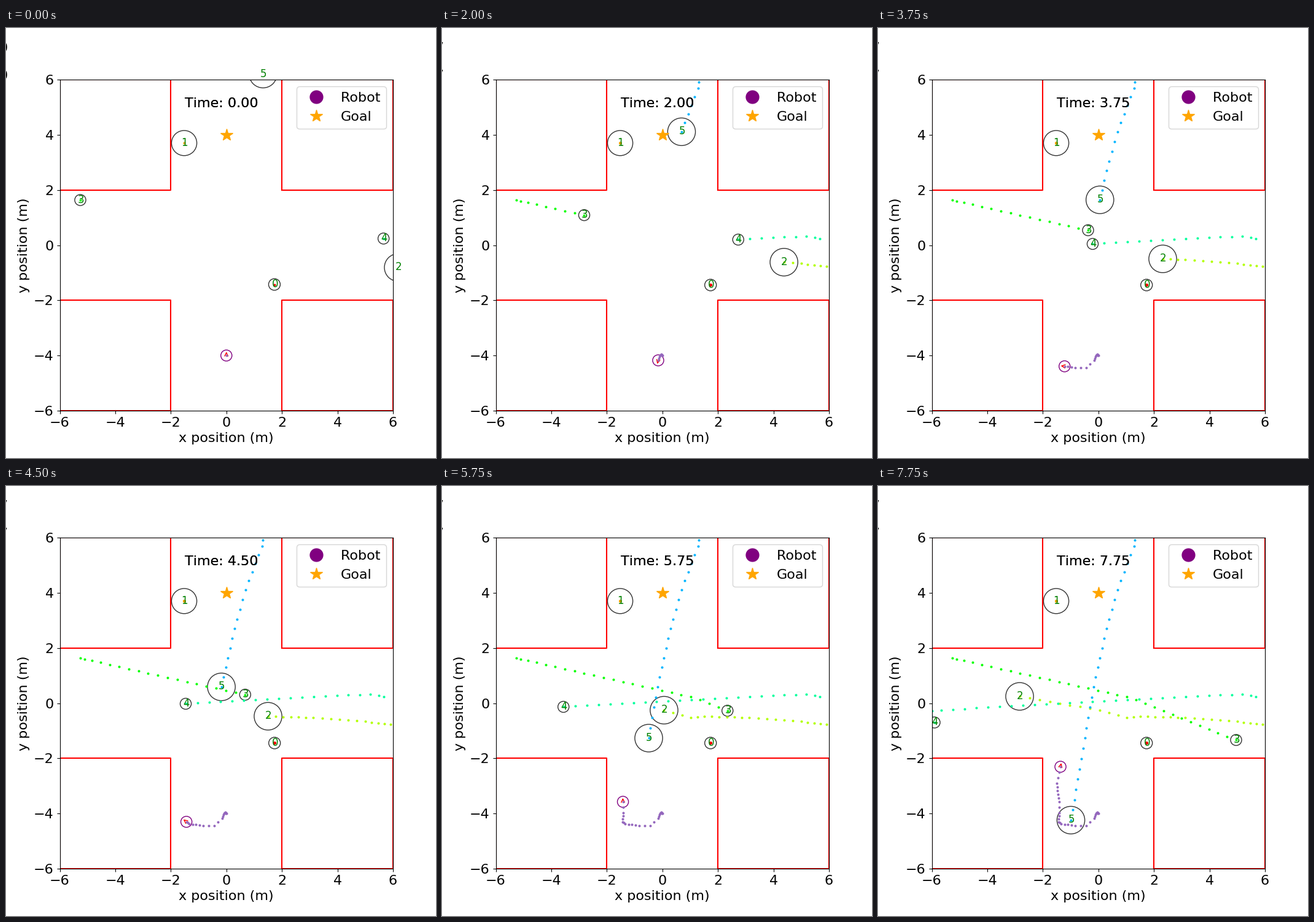
A matplotlib script that plays this animation: 700x700 px, repeating every 8 s.

```python
import numpy as np
import matplotlib.pyplot as plt
from matplotlib.animation import FuncAnimation
from matplotlib.lines import Line2D
from matplotlib.patches import ArrowStyle, Circle, FancyArrowPatch

STEPS = 32
DT = 0.25
ROBOT_R = 0.2

plt.rcParams["font.family"] = "DejaVu Sans"
plt.rcParams["text.kerning_factor"] = 6


def walk(*keys):
    """Steady walk between (step, x, y) key points, with a soft start.

    The walker's clock begins at 1 and settles onto the step number.
    """
    k, x, y = np.array(keys, dtype=float).T
    steps = np.arange(STEPS)
    clock = steps + np.exp(-steps / 1.2)
    return np.column_stack([np.interp(clock, k, x), np.interp(clock, k, y)])


# Radius and path of each person
humans = [
    (.21, walk((1, 1.73, -1.425), (4, 1.735, -1.445))),
    (.455, walk((1, -1.52, 3.70))),
    (.5, walk((1, 6.19, -.81), (6, 5.0, -.665), (12, 3.135, -.52),
              (18, 1.5, -.475), (20, 1.03, -.53), (23, .06, -.255),
              (31, -2.835, .245))),
    (.2, walk((1, -5.26, 1.635), (19.5, 1.2, .19), (31, 4.96, -1.335))),
    (.2, walk((1, 5.66, .24), (2, 5.25, .335), (28, -5.66, -.245),
              (29.3, -6.1, -.3), (31, -5.9, -.7))),
    (.5, walk((1, 1.32, 6.2), (3, 1.29, 5.72), (8, .69, 4.11),
              (12, .29, 2.695), (18, -.18, .59), (31, -.99, -4.24))),
]

robot = walk((1, 0, -4), (3, -.04, -3.95), (6, -.11, -4.03),
             (8, -.15, -4.175), (10, -.44, -4.44), (12, -.835, -4.44),
             (16, -1.345, -4.375), (18, -1.44, -4.3), (21, -1.405, -3.975),
             (23, -1.42, -3.575), (28, -1.5, -2.9), (31, -1.365, -2.305))

fig, ax = plt.subplots(figsize=(7, 7), dpi=100)
ax.set_xlim(-6, 6)
ax.set_ylim(-6, 6)
ax.set_xticks(range(-6, 7, 2))
ax.set_yticks(range(-6, 7, 2))
ax.tick_params(labelsize=16)
ax.set_xlabel("x position (m)", fontsize=16)
ax.set_ylabel("y position (m)", fontsize=16)

# Four corner blocks leave a crossing free
for x in (-6, 2):
    for y in (-6, 2):
        ax.plot([x, x + 4, x + 4, x, x], [y, y, y + 4, y + 4, y],
                color="red", lw=1.5)

goal = Line2D([0], [4], color="orange", marker="*", ls="None", ms=15)
ax.add_artist(goal)
robot_key = Line2D([], [], color="purple", marker="o", ls="None", ms=15)
ax.legend([robot_key, goal], ["Robot", "Goal"], fontsize=16,
          loc="upper right", numpoints=1)


class Walker:
    """A ring that leaves one dot per step."""

    def __init__(self, path, radius, edge, dot, alpha=1):
        self.path = path
        self.ring = ax.add_patch(Circle(path[0], radius, fill=False, lw=1,
                                        ec=edge, alpha=alpha))
        self.trail, = ax.plot([], [], "o", color=dot, ms=2.9, mew=0,
                              zorder=1.5)

    def move(self, k):
        self.ring.center = self.path[k]
        self.trail.set_data(*self.path[:k + 1].T)


people = [Walker(path, r, "black", plt.cm.hsv(i / 9), alpha=.8)
          for i, (r, path) in enumerate(humans)]
labels = [ax.text(0, 0, str(i), color="green", fontsize=12)
          for i in range(len(people))]

rover = Walker(robot, ROBOT_R, "purple", "tab:purple")
arrow = FancyArrowPatch((0, 0), (0, 1), color="red", mutation_scale=1,
                        arrowstyle=ArrowStyle("->", head_length=4,
                                              head_width=2))
ax.add_patch(arrow)

# The clock is printed twice, which gives it a heavier edge
clocks = [ax.text(-1.5, 5, "", fontsize=16) for _ in range(2)]
# Last digits of two readouts cut off by the left border
readouts = [ax.text(-8.2, y, "", fontsize=16) for y in (7, 6)]


def heading(k):
    """Unit vector of the last move; the robot starts facing up."""
    if k == 0:
        return np.array([0, 1])
    step = robot[k] - robot[k - 1]
    return step / np.hypot(*step)


def update(k):
    for person, label in zip(people, labels):
        person.move(k)
        label.set_position(person.path[k] - .1)

    rover.move(k)
    arrow.set_positions(robot[k], robot[k] + ROBOT_R * heading(k))

    for clock in clocks:
        clock.set_text(f"Time: {k * DT:.2f}")
    for readout in readouts:
        readout.set_text("0" if k * DT < 1 else "7")
    return []


anim = FuncAnimation(fig, update, frames=STEPS, init_func=lambda: [],
                     interval=1000 * DT, repeat=True, repeat_delay=0)
plt.show()
```
